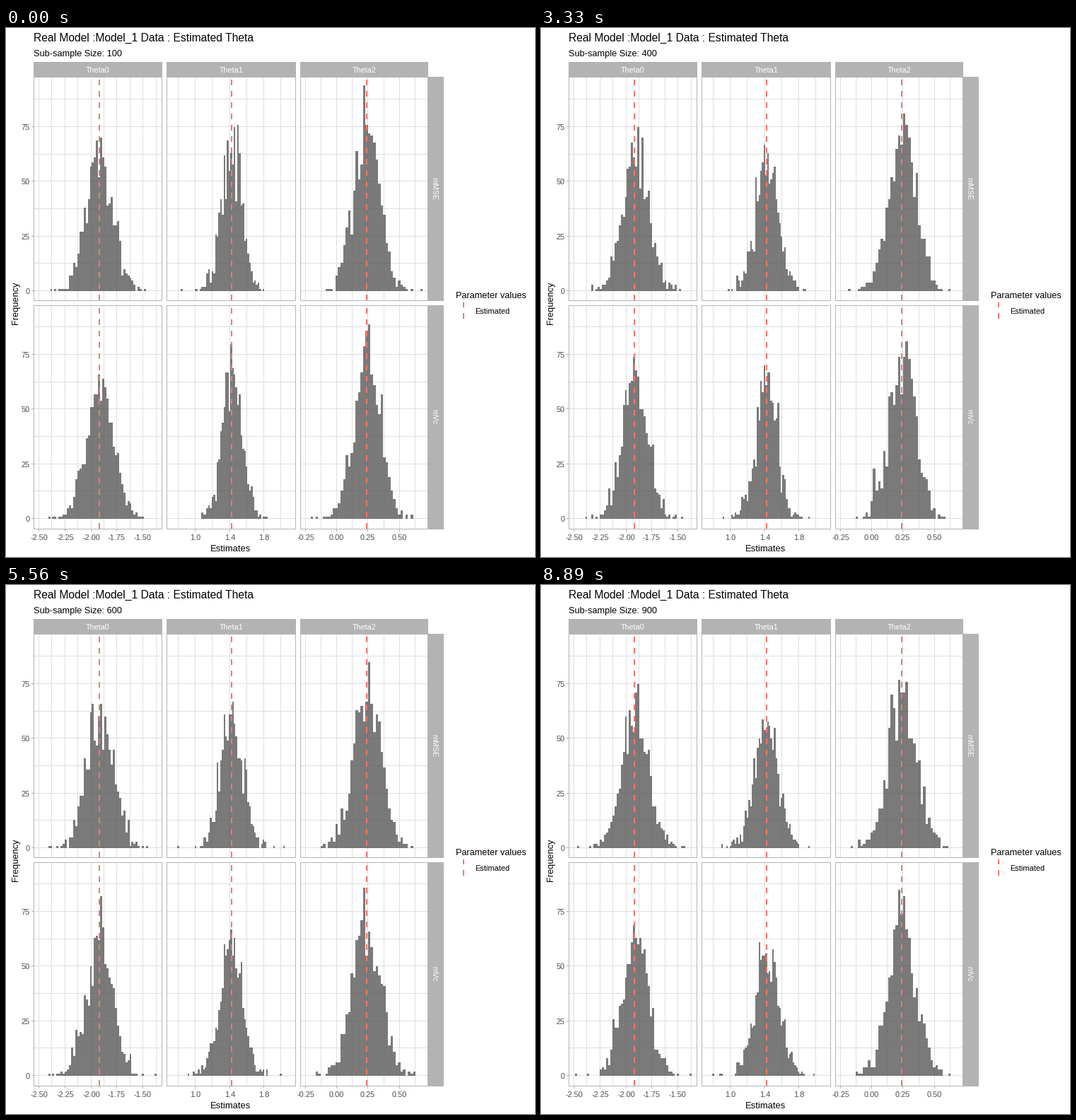
A matplotlib script for the animation above (10 s loop, 748 px wide and 748 px high).

```python
import numpy as np
import matplotlib.pyplot as plt
from matplotlib.animation import FuncAnimation
from matplotlib.collections import LineCollection
from matplotlib.patches import Polygon, Rectangle

SIDE, PT = 748, 0.72          # stage in px; points per px at 100 dpi
STEPS, FRAMES, TICK = 9, 200, 50
GREY, GRID, DARK, RED = "#B3B3B3", "#DEDEDE", "#4D4D4D", "#F8766D"
BIN, Y_UNIT = 0.02, 3.093     # bin width; px per count
DASH = 8

plt.rcParams["font.family"] = "Liberation Sans"
fig = plt.figure(figsize=(SIDE / 100, SIDE / 100), dpi=100, facecolor="white")
ax = fig.add_axes([0, 0, 1, 1])
ax.set(xlim=(0, SIDE), ylim=(SIDE, 0))
ax.axis("off")

# zero and unit map estimates to px; sd spans the smallest to largest sample
COLS = [
    dict(name="Theta0", x0=39, x1=221, zero=414.8, unit=147.4, step=0.125,
         ticks=("-2.50", "-2.25", "-2.00", "-1.75", "-1.50"), est=132,
         mean=-1.912, sd=(0.131, 0.133)),
    dict(name="Theta1", x0=227, x1=410, zero=147.2, unit=120.6, step=0.2,
         ticks=("1.0", "1.4", "1.8"), est=319, mean=1.428, sd=(0.123, 0.141)),
    dict(name="Theta2", x0=416, x1=597, zero=467.7, unit=176.8, step=0.125,
         ticks=("-0.25", "0.00", "0.25", "0.50"), est=510,
         mean=0.242, sd=(0.105, 0.115)),
]
ROWS = [dict(name="mMSE", top=69, bottom=385, zero=372),
        dict(name="mVc", top=392, bottom=708, zero=694)]
PANELS = [(col, row) for row in ROWS for col in COLS]


def label(x, y, text, px, color="black", ha="left", rot=0):
    return ax.text(x, y, text, size=px * PT, color=color, ha=ha, va="baseline",
                   rotation=rot, rotation_mode="anchor")


def lines(segments, color, width=1, z=1):
    # Coordinates already sit on pixel centres, so snapping would shift them
    ax.add_collection(LineCollection(segments, colors=color, linewidths=width * PT,
                                     capstyle="butt", zorder=z, snap=False))


def box(x0, y0, x1, y1, z, **style):
    ax.add_patch(Rectangle((x0, y0), x1 - x0, y1 - y0, zorder=z, **style))


def mid(v):
    return np.floor(v) + 0.5


def dashed(x, top, bottom):
    starts = np.arange(bottom, top, -2 * DASH)
    lines([[(x, y), (x, max(y - DASH, top))] for y in starts], RED, 2, 4)


def draw_panel(col, row):
    x0, x1, top, bottom = col["x0"], col["x1"], row["top"], row["bottom"]
    xs = mid(col["zero"] + np.arange(-40, 40) * col["step"] * col["unit"])
    ys = mid(row["zero"] - 0.5 - np.arange(0, 88, 12.5) * Y_UNIT)
    lines([[(x, top), (x, bottom)] for x in xs if x0 < x < x1], GRID)
    lines([[(x0, y), (x1, y)] for y in ys], GRID)
    dashed(col["est"], top, bottom)
    box(x0 + 0.5, top + 0.5, x1 - 0.5, bottom + 0.5, 5,
        fill=False, ec=GREY, lw=PT, snap=False)
    return ax.add_patch(Polygon([(0, 0), (0, 0)], closed=True, fc="#595959",
                                alpha=0.8, lw=0, zorder=3))


def draw_frame():
    label(39, 19, "Real Model :Model_1 Data : Estimated Theta", 15.6)
    label(317.5, 740, "Estimates", 13, ha="center")
    label(17, 388.5, "Frequency", 12.7, ha="center", rot=90)
    for col in COLS:
        center = (col["x0"] + col["x1"]) / 2
        box(col["x0"], 48, col["x1"], 69, 2, fc=GREY, lw=0)
        label(center, 63, col["name"], 10.8, "white", "center")
        for text in col["ticks"]:
            x = mid(col["zero"] + float(text) * col["unit"])
            lines([[(x, 709), (x, 712)]], GREY)
            label(x, 724, text, 11, DARK, "center")
    for row in ROWS:
        center = (row["top"] + row["bottom"]) / 2
        box(597, row["top"], 619, row["bottom"] + 1, 2, fc=GREY, lw=0)
        label(602, center, row["name"], 10.8, "white", "center", 270)
        for count in (0, 25, 50, 75):
            y = mid(row["zero"] - 0.5 - count * Y_UNIT)
            lines([[(36, y), (39, y)]], GREY)
            label(34, y + 4.5, str(count), 11, DARK, "right")
    label(636, 382, "Parameter values", 12.8)
    label(663, 404, "Estimated", 11)
    dashed(647, 388, 411)


def outline(col, row, size, seed):
    """Stepped outline of the histogram of 1000 simulated estimates."""
    rng = np.random.default_rng(seed)
    sd = np.interp(size, (100, 900), col["sd"])
    draws = col["mean"] + sd * 0.96 * rng.standard_t(25, 1000)
    edges = (round(col["mean"] / BIN) + np.arange(-33, 35) - 0.5) * BIN
    counts, _ = np.histogram(draws, edges)
    xs = np.round(col["zero"] + edges * col["unit"])
    xs = np.clip(xs, col["x0"] + 8, col["x1"] - 8)
    ys = np.round(row["zero"] - counts * Y_UNIT)
    ys = np.concatenate([[row["zero"]], np.repeat(ys, 2), [row["zero"]]])
    return np.column_stack([np.repeat(xs, 2), ys])


draw_frame()
bars = [draw_panel(col, row) for col, row in PANELS]
subtitle = label(39, 40, "", 12.8)
shapes = [[outline(col, row, 100 * (k + 1), 10 * k + n)
           for n, (col, row) in enumerate(PANELS)] for k in range(STEPS)]


def update(frame):
    k = (STEPS * frame + STEPS - 1) // FRAMES
    subtitle.set_text(f"Sub-sample Size: {100 * (k + 1)}")
    for patch, shape in zip(bars, shapes[k]):
        patch.set_xy(shape)
    return [subtitle, *bars]


anim = FuncAnimation(fig, update, frames=FRAMES, interval=TICK, repeat=True,
                     repeat_delay=0, blit=False)
plt.show()
```
